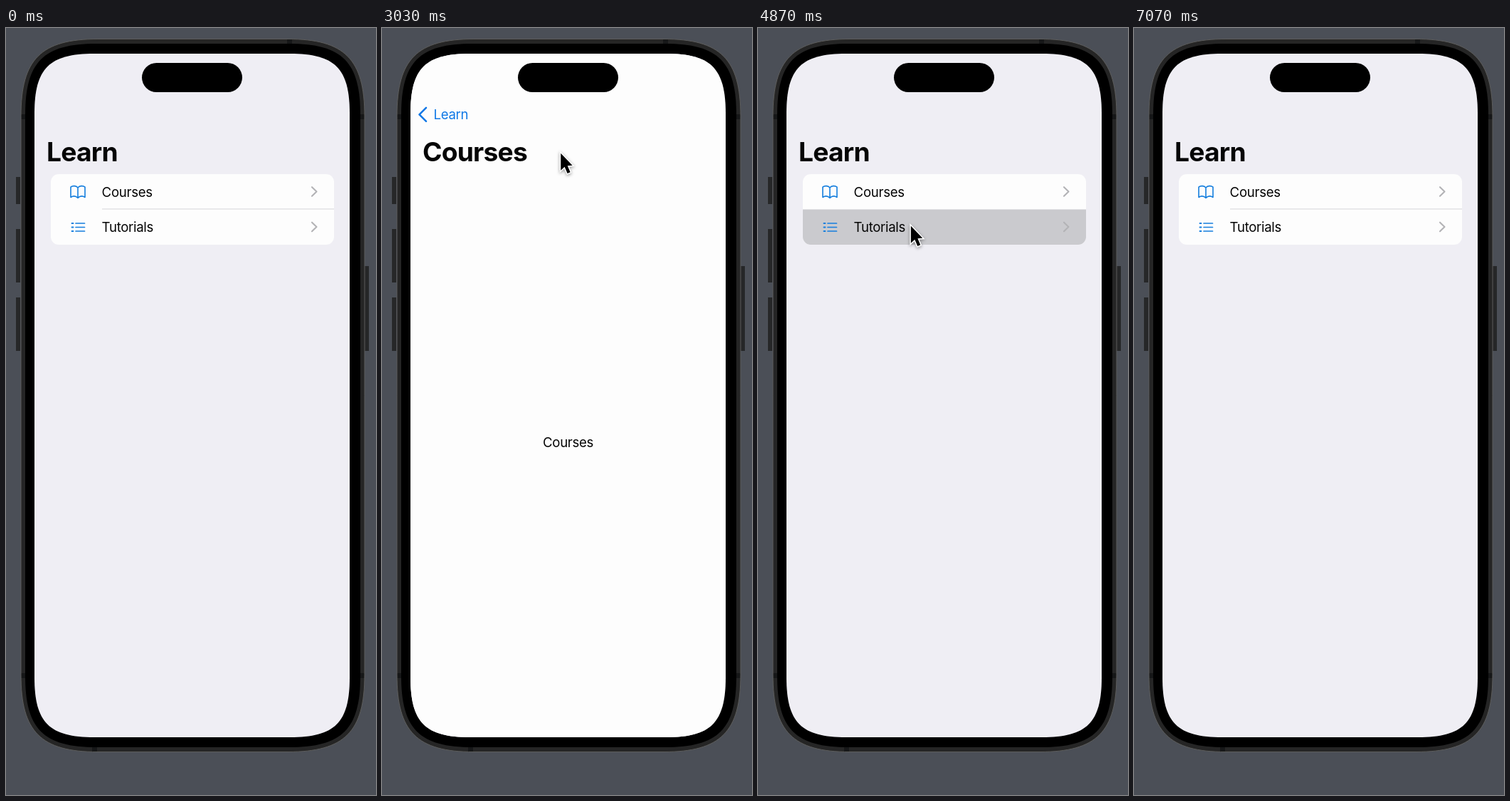
An HTML page with a canvas that plays this animation: 520 px wide and 1076 px high, repeating every 7.11 s.

```html
<!DOCTYPE html>
<html lang="en">
<head>
<meta charset="utf-8">
<title>List navigation</title>
<style>
html, body { margin: 0; width: 100%; height: 100%; overflow: hidden; background: #4b4f57; }
canvas { display: block; width: 520px; height: 1076px; }
</style>
</head>
<body>
<canvas id="stage"></canvas>
<script>
const LOOP = 7110, W = 520, H = 1076;
const SCREEN = { x: 40, y: 36, w: 443, h: 959 };
const BLUE = '#0f78e6', PAPER = '#fdfdfd', LIST_BG = '#efeef4';
const FONT = 'Inter, "Open Sans", sans-serif';

// time, whether the list is revealed
const MOVES = [[2440, false], [3609, true], [4940, false], [5609, true]];
// row, pressed, released
const PRESSES = [[0, 2290, 3609], [1, 4810, 5609]];
const CLICKS = [[2130, 2285], [3470, 3612], [4650, 4800], [5450, 5605]];
// time, x, y, bow on the way here
const PATH = [
  [270, 204, 653, 0], [1000, 213, 629, 0], [1430, 274, 358, 0], [1570, 274, 358, 0],
  [2050, 336, 213, 0], [2700, 336, 213, 0], [3490, 110, 122, -4], [3740, 110, 122, 0],
  [4540, 214, 277, 0], [4860, 214, 277, 0], [5430, 112.5, 124, 0], [5660, 112.5, 124, 0],
  [6220, 5, 330, 0]
];

const canvas = document.getElementById('stage');
const ctx = canvas.getContext('2d');
const dpr = window.devicePixelRatio || 1;
canvas.width = W * dpr;
canvas.height = H * dpr;

const clamp = v => Math.max(0, Math.min(1, v));
const lerp = (a, b, u) => a + (b - a) * u;
const smooth = u => u * u * (3 - 2 * u);

function spring(ms) {
  const k = Math.max(0, ms) * 0.014;
  return k > 7.4 ? 1 : 1 - (1 + k) * Math.exp(-k);
}

function reveal(t) {
  let p = 1;
  for (const [start, open] of MOVES) {
    if (t >= start) p = open ? spring(t - start) : 1 - spring(t - start);
  }
  return p;
}

function pressed(row, t) {
  let h = 0;
  for (const [r, on, off] of PRESSES) {
    if (r === row && t >= on) h = clamp(1 - (t - off) / 500);
  }
  return h;
}

function squircle(x, y, w, h, e, k) {
  const c = e * (1 - k), r = x + w, b = y + h;
  ctx.beginPath();
  ctx.moveTo(x + e, y);
  ctx.lineTo(r - e, y);
  ctx.bezierCurveTo(r - c, y, r, y + c, r, y + e);
  ctx.lineTo(r, b - e);
  ctx.bezierCurveTo(r, b - c, r - c, b, r - e, b);
  ctx.lineTo(x + e, b);
  ctx.bezierCurveTo(x + c, b, x, b - c, x, b - e);
  ctx.lineTo(x, y + e);
  ctx.bezierCurveTo(x, y + c, x + c, y, x + e, y);
  ctx.closePath();
}

function rect(x, y, w, h, color) {
  ctx.fillStyle = color;
  ctx.fillRect(x, y, w, h);
}

function pill(x, y, w, h, r, color) {
  ctx.beginPath();
  ctx.roundRect(x, y, w, h, r);
  ctx.fillStyle = color;
  ctx.fill();
}

function text(str, x, y, size, weight, color, alpha = 1) {
  if (alpha <= 0) return;
  ctx.save();
  ctx.globalAlpha *= alpha;
  ctx.font = `${weight} ${size}px ${FONT}`;
  ctx.letterSpacing = (weight > 500 ? -0.021 : -0.016) * size + 'px';
  ctx.fillStyle = color;
  ctx.fillText(str, x, y);
  ctx.restore();
}

function line(points, width, color) {
  ctx.beginPath();
  points.forEach(([x, y]) => ctx.lineTo(x, y));
  ctx.lineWidth = width;
  ctx.strokeStyle = color;
  ctx.stroke();
}

function body() {
  rect(0, 0, W, H, '#4b4f57');
  for (const [x, y, h] of [[14, 209, 38], [14, 282, 75], [14, 378, 75], [504, 334, 119]]) {
    rect(x, y, 6, h, '#262728');
  }
  squircle(21, 15.5, 483, 1000, 108, 0.74);
  ctx.fillStyle = '#252525';
  ctx.fill();
  ctx.save();
  ctx.clip();
  for (const [x, y] of [[395, 15], [121, 1009], [21, 121], [21, 905], [498, 121], [498, 905]]) {
    rect(x, y, 7, 7, '#161718');
  }
  ctx.restore();
  ctx.lineWidth = 1;
  ctx.strokeStyle = '#5d5d5c';
  ctx.stroke();
  squircle(27, 22, 471, 987, 100, 0.745);
  ctx.fillStyle = '#000';
  ctx.fill();
}

function book() {
  ctx.beginPath();
  for (const s of [-1, 1]) {
    ctx.moveTo(101, 224);
    ctx.bezierCurveTo(101 + s * 2.5, 221, 101 + s * 7.5, 221, 101 + s * 10, 223.2);
    ctx.lineTo(101 + s * 10, 237.5);
    ctx.bezierCurveTo(101 + s * 7, 235.5, 101 + s * 3, 235.5, 101, 238.3);
  }
  ctx.moveTo(101, 224);
  ctx.lineTo(101, 238);
  ctx.lineWidth = 1.6;
  ctx.strokeStyle = '#147ede';
  ctx.stroke();
}

function bullets() {
  for (const y of [274, 279.5, 285]) {
    line([[92.5, y], [94.5, y]], 1.9, '#147ede');
    line([[98, y], [110.5, y]], 1.7, '#147ede');
  }
}

function list(t) {
  const hot = [pressed(0, t), pressed(1, t)];
  rect(-100, 36, 700, 959, LIST_BG);
  ctx.save();
  ctx.beginPath();
  ctx.roundRect(63, 205, 398, 99, 11);
  ctx.clip();
  rect(63, 205, 398, 99, PAPER);
  ctx.globalAlpha = 1 - Math.max(...hot);
  rect(135, 253.4, 326, 1.1, '#d9d9dc');
  hot.forEach((h, i) => {
    ctx.globalAlpha = h;
    rect(63, 205 + i * 49.5, 398, 49.5, '#cacace');
  });
  ctx.restore();
  book();
  bullets();
  text('Courses', 134.6, 236.6, 18.6, 400, '#050505');
  text('Tutorials', 134.6, 286.2, 18.6, 400, '#050505');
  for (const y of [229.5, 279]) {
    line([[430, y - 6.3], [436.5, y], [430, y + 6.3]], 2.1, '#b3b3b6');
  }
}

function navBar(q) {
  const x = lerp(72.5, 57, q), y = lerp(128.2, 187, q), size = lerp(18.6, 37.2, q);
  const weight = Math.round(lerp(4, 7, clamp(q * 4))) * 100;
  text('Learn', x, y, size, weight, BLUE, (1 - q) ** 3);
  text('Learn', x, y, size, 700, '#050505', q);
  text('Courses', 57 + SCREEN.w * q, 187, 37.2, 700, '#050505', 1 - q);
  ctx.save();
  ctx.globalAlpha = clamp(1 - q * 4);
  line([[62, 111.8], [52.5, 121.3], [62, 130.8]], 2.6, BLUE);
  ctx.restore();
}

function screen(t) {
  const p = reveal(t), q = reveal(t - 14), edge = SCREEN.x + SCREEN.w * p;
  ctx.save();
  squircle(SCREEN.x, SCREEN.y, SCREEN.w, SCREEN.h, 84, 0.755);
  ctx.clip();
  ctx.save();
  ctx.translate(-0.3 * SCREEN.w * (1 - p), 0);
  list(t);
  ctx.restore();
  rect(40, 36, 443, 959, `rgba(0,0,0,${0.11 * (1 - p)})`);
  if (p < 1) {
    rect(edge, 36, 443, 959, PAPER);
    text('Courses', edge + 186, 588, 18.6, 400, '#050505');
  }
  navBar(q);
  ctx.restore();
  pill(191, 49, 141, 41, 20.5, '#000');
}

function pointerAt(t) {
  let i = 1;
  while (i < PATH.length - 1 && t > PATH[i][0]) i++;
  const [t0, x0, y0] = PATH[i - 1], [t1, x1, y1, bow] = PATH[i];
  const u = clamp((t - t0) / (t1 - t0)), s = smooth(u);
  return [lerp(x0, x1, s), lerp(y0, y1, s) + bow * Math.sin(Math.PI * s)];
}

function arrow() {
  ctx.beginPath();
  ctx.moveTo(1, 1);
  for (const [x, y] of [[1, 25], [6.4, 20], [10.4, 29.2], [14.4, 27.5], [10.5, 18.4], [17.4, 18]]) {
    ctx.lineTo(x, y);
  }
  ctx.closePath();
}

function pointer(t) {
  const shown = clamp((t - 260) / 100) * clamp((6260 - t) / 60);
  if (!shown) return;
  const [x, y] = pointerAt(t);
  ctx.save();
  ctx.translate(x, y);
  ctx.globalAlpha = shown;
  for (const [down, up] of CLICKS) {
    if (t < down || t >= up) continue;
    const grow = smooth(clamp((t - down + 20) / 70));
    ctx.save();
    ctx.globalAlpha = grow;
    for (const [r, w, color] of [[35, 2.4, '#fff'], [36.8, 2.5, '#111']]) {
      ctx.beginPath();
      ctx.arc(-1, 1, r * lerp(0.7, 1, grow), 0, Math.PI * 2);
      ctx.lineWidth = w;
      ctx.strokeStyle = color;
      ctx.stroke();
    }
    ctx.restore();
  }
  ctx.save();
  ctx.shadowColor = 'rgba(0,0,0,.4)';
  ctx.shadowBlur = 4 * dpr;
  ctx.shadowOffsetY = 1.5 * dpr;
  arrow();
  ctx.lineWidth = 3;
  ctx.lineJoin = 'miter';
  ctx.strokeStyle = '#fff';
  ctx.stroke();
  ctx.restore();
  arrow();
  ctx.fillStyle = '#000';
  ctx.fill();
  ctx.restore();
}

function draw(t) {
  ctx.setTransform(dpr, 0, 0, dpr, 0, 0);
  ctx.lineCap = ctx.lineJoin = 'round';
  body();
  screen(t);
  pointer(t);
}

const began = performance.now();
function tick() {
  draw((performance.now() - began) % LOOP);
  requestAnimationFrame(tick);
}
tick();
</script>
</body>
</html>
```
